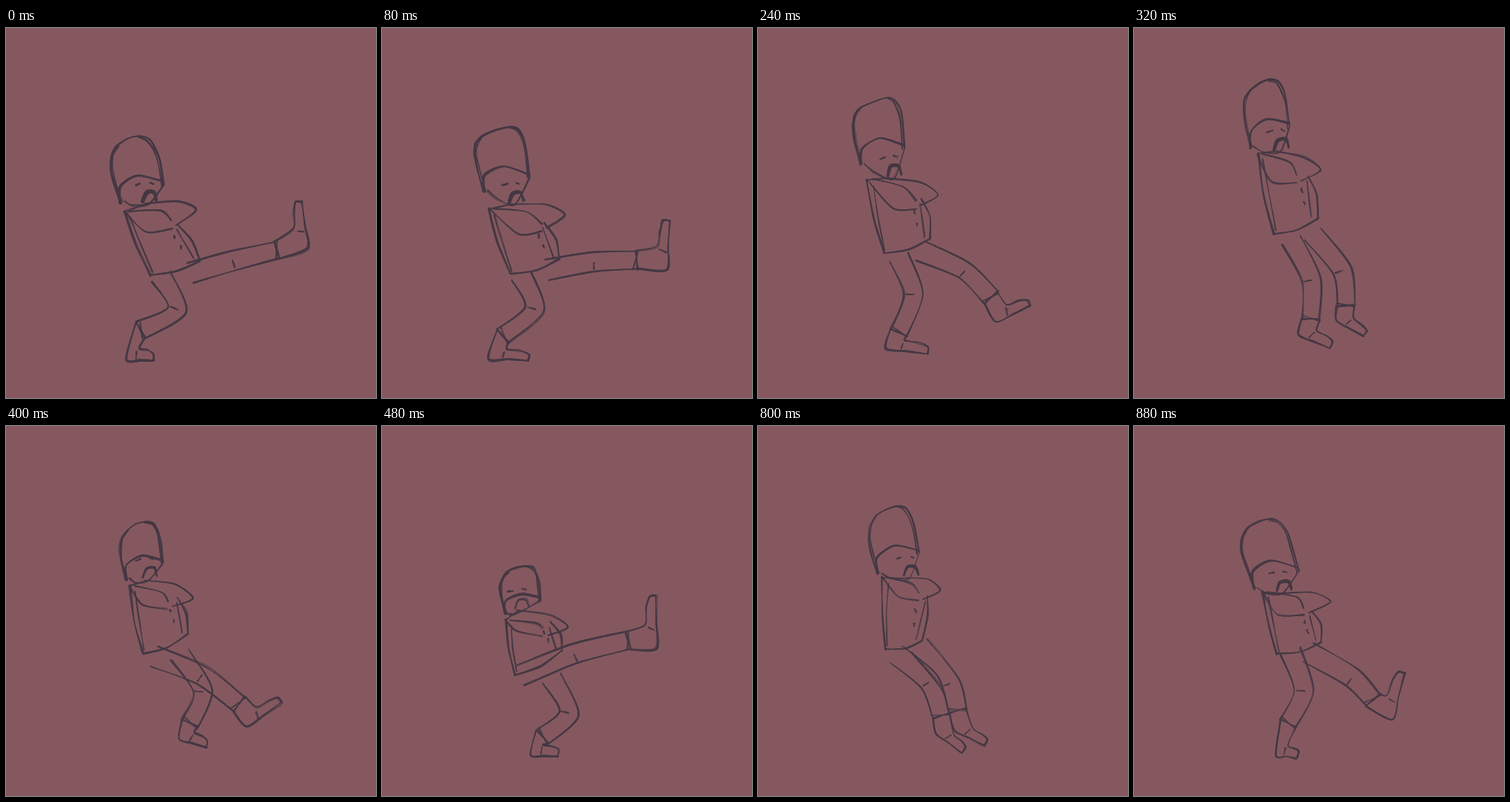
An HTML page with a canvas that plays this animation: 500x500 px, repeating every 0.96 s.

```html
<!DOCTYPE html>
<html lang="en">
<head>
<meta charset="utf-8">
<title>Kick dance sketch</title>
<style>
  html, body { margin: 0; height: 100%; overflow: hidden; background: #85585f; }
  canvas { display: block; width: 100vmin; height: 100vmin; }
</style>
</head>
<body>
<canvas id="stage" width="500" height="500"></canvas>
<script>
const ctx = document.getElementById('stage').getContext('2d');
const STEP = 80;
const LEGS = ['near', 'far'];

// head: brim left, brim right, hat top, mouth
// body: shoulder, back hip, chest, front hip, forearm bend, far elbow
// legs: hip, knee, ankle, heel, toe
// style: line weight, hat roundness, moustache width
function pose(head, body, near, far, style) {
  const points = n => n.filter((_, i) => i % 2 === 0).map((x, i) => [x, n[2 * i + 1]]);
  return { head: points(head), body: points(body), near: points(near), far: points(far), style };
}

const leanBack = pose(
  [155, 236, 213, 212, 165, 150, 196, 226],
  [160, 248, 196, 334, 232, 266, 262, 314, 190, 276, 258, 246],
  [209, 336, 232, 380, 182, 408, 162, 448, 200, 449],
  [249, 331, 306, 314, 366, 300, 408, 298, 400, 234], [1.2, .8, 4.2]);

const upright = pose(
  [120, 207, 186, 192, 143, 124, 170, 227],
  [128, 240, 151, 330, 206, 262, 218, 312, 180, 280, 236, 258],
  [168, 334, 182, 379, 146, 424, 125, 447, 196, 447],
  [197, 324, 265, 320, 320, 328, 354, 355, 372, 291], [1.05, .5, 4]);

const highHop = pose(
  [158, 162, 210, 134, 170, 74, 201, 155],
  [167, 170, 189, 278, 236, 200, 248, 258, 187, 207, 252, 192],
  [213, 286, 240, 340, 239, 393, 222, 415, 264, 432],
  [242, 278, 281, 328, 286, 375, 273, 395, 310, 417], [1, .8, 4.2]);

const crouch = pose(
  [166, 254, 214, 236, 182, 191, 191, 238],
  [167, 262, 180, 336, 228, 265, 244, 304, 182, 276, 252, 272],
  [187, 337, 260, 308, 333, 290, 370, 300, 371, 230],
  [229, 341, 252, 388, 217, 420, 200, 444, 238, 447], [1.1, .8, 1.5]);

const lowKick = pose(
  [165, 252, 214, 236, 178, 183, 192, 241],
  [167, 256, 172, 345, 228, 262, 238, 306, 180, 284, 243, 276],
  [184, 348, 250, 322, 322, 315, 356, 338, 367, 280],
  [202, 352, 232, 386, 200, 417, 182, 442, 232, 446], [.85, .8, 1.5]);

const hop = pose(
  [162, 200, 217, 172, 172, 112, 208, 194],
  [168, 204, 172, 302, 228, 230, 222, 290, 190, 230, 246, 222],
  [186, 308, 232, 346, 247, 391, 240, 415, 275, 442],
  [218, 296, 260, 348, 270, 385, 266, 412, 305, 432], [.9, .8, 4]);

const swingUp = pose(
  [162, 220, 222, 196, 168, 129, 204, 214],
  [173, 224, 194, 308, 240, 250, 254, 292, 194, 254, 265, 238],
  [211, 304, 230, 358, 208, 402, 192, 444, 220, 449],
  [236, 306, 294, 340, 323, 370, 348, 396, 366, 334], [.95, .8, 4.2]);

const mix = (a, b, t = .5) => a.map((v, i) => v + (b[i] - v) * t);
const move = ([x, y], dx, dy) => [x + dx, y + dy];
const along = (p, v, k) => move(p, v[0] * k, v[1] * k);
const diff = (a, b) => [b[0] - a[0], b[1] - a[1]];
const unit = v => v.map(c => c / (Math.hypot(...v) || 1));

// Legs swing about the hip so that they keep their length halfway.
function swing(p, q, hipA, hipB) {
  const a = diff(hipA, p), b = diff(hipB, q);
  const from = Math.atan2(a[1], a[0]), turn = Math.atan2(b[1], b[0]) - from;
  const angle = from + Math.atan2(Math.sin(turn), Math.cos(turn)) / 2;
  return along(mix(hipA, hipB), [Math.cos(angle), Math.sin(angle)], (Math.hypot(...a) + Math.hypot(...b)) / 2);
}

function between(a, b) {
  const half = { style: mix(a.style, b.style) };
  for (const g of ['head', 'body']) half[g] = a[g].map((p, i) => mix(p, b[g][i]));
  for (const g of LEGS) half[g] = a[g].map((p, i) => swing(p, b[g][i], a[g][0], b[g][0]));
  return half;
}

const cycle = [
  leanBack, between(leanBack, upright), upright, between(upright, highHop),
  highHop, between(highHop, crouch), crouch, between(crouch, lowKick),
  lowKick, between(lowKick, hop), hop, swingUp
];

function hatStrokes([left, right, top, mouth], [, round, moustache]) {
  const base = mix(left, right), side = diff(base, right), up = diff(base, top);
  const dome = Array.from({ length: 11 }, (_, i) => {
    const a = Math.PI * (1 - i / 10), s = Math.sin(a), c = Math.cos(a);
    const x = Math.sign(c) * Math.abs(c) ** round * (1 + .4 * s);
    return along(along(base, side, x), up, Math.abs(s) ** round);
  });
  const at = (dx, dy) => move(mouth, dx, dy);
  return [
    [2.1, dome],
    [1.6, dome.slice(6).map(p => along(p, side, -.09))],
    [1.5, dome.slice(0, 5).map(p => along(p, side, .07))],
    [2.7, [left, along(mix(left, right, .08), up, .28), along(base, up, .33), along(right, up, .06)]],
    [1.6, [mix(left, right, .08), move(mix(left, mouth, .4), 0, 8), at(-3, 12), right]],
    [moustache, [at(-11, 9), at(-6, -3), at(4, -4), at(8, 7)]],
    [1.9, [at(-21, -14), at(-14, -16)]],
    [1.5, [at(-2, -18), at(3, -16)]]
  ];
}

function bodyStrokes([shoulder, back, chest, waist, bend, elbow], mouth) {
  const chin = move(mouth, -8, 12), rest = mix(bend, elbow);
  const button = t => move(mix(chest, waist, t), -14, 0);
  return [
    [2.4, [shoulder, move(mix(shoulder, back), -2, 3), back]],
    [1.5, [move(shoulder, 8, 8), move(mix(shoulder, back), 4, 0), move(back, 2, -4)]],
    [2.1, [chest, move(mix(chest, waist), 5, -3), waist]],
    [1.4, [move(chest, -2, 6), move(waist, -8, -2)]],
    [2.2, [back, move(mix(back, waist), 2, 5), waist]],
    [1.8, [shoulder, bend, move(rest, 0, 10)]],
    [1.8, [move(shoulder, 6, 0), mix(shoulder, elbow, .5), rest]],
    [1.9, [chin, move(mix(chin, elbow, .6), 2, -8), elbow, move(mix(elbow, bend, .4), 0, 8)]],
    [1.4, [shoulder, chin]],
    [1.7, [button(.3), move(button(.3), 1, 4)]],
    [1.7, [button(.6), move(button(.6), 1, 4)]]
  ];
}

function legStrokes([hip, knee, ankle, heel, toe]) {
  const thigh = unit(diff(hip, knee)), shin = unit(diff(knee, ankle));
  const dirs = [thigh, unit(mix(thigh, shin)), shin];
  const edge = side => [hip, knee, ankle].map((p, i) => along(p, [-dirs[i][1], dirs[i][0]], side * (14 - i)));
  const a = edge(1), b = edge(-1);
  const gap = p => Math.hypot(...diff(p, toe));
  const [front, rear] = gap(a[2]) < gap(b[2]) ? [a[2], b[2]] : [b[2], a[2]];
  const sole = unit(diff(heel, toe));
  let up = [sole[1], -sole[0]];
  const rise = diff(heel, ankle);
  if (up[0] * rise[0] + up[1] * rise[1] < 0) up = up.map(c => -c);
  const upper = (t, h) => along(mix(heel, toe, t), up, h);
  return [
    [2.1, a], [2.1, b],
    [2.2, [a[2], b[2]]],
    [1.4, [along(a[2], shin, -5), along(b[2], shin, 3)]],
    [1.5, [mix(a[1], b[1], .1), mix(a[1], b[1], .5)]],
    [2.3, [rear, heel, mix(heel, toe), toe]],
    [1.9, [toe, upper(1, 9), upper(.78, 13), upper(.45, 15), front]],
    [1.4, [upper(.35, 2), upper(.4, 11)]]
  ];
}

function random(seed) {
  return () => (seed = seed * 16807 % 2147483647) / 2147483647;
}

function smooth(points) {
  const out = [points[0]];
  const at = i => points[Math.max(0, Math.min(points.length - 1, i))];
  for (let i = 0; i < points.length - 1; i++) {
    for (let k = 1; k <= 10; k++) {
      const t = k / 10, t2 = t * t, t3 = t2 * t;
      out.push([0, 1].map(c => {
        const p = at(i)[c], q = at(i + 1)[c];
        const m = .4 * (q - at(i - 1)[c]), n = .4 * (at(i + 2)[c] - p);
        return (2 * t3 - 3 * t2 + 1) * p + (t3 - 2 * t2 + t) * m + (3 * t2 - 2 * t3) * q + (t3 - t2) * n;
      }));
    }
  }
  return out;
}

// A pencil line whose pressure rises and falls along its length.
function pencil(points, width, rand) {
  const path = smooth(points.map(p => move(p, rand() * 2.4 - 1.2, rand() * 2.4 - 1.2)));
  const phase = rand() * Math.PI;
  for (let i = 1; i < path.length; i++) {
    ctx.lineWidth = width * (.5 + .65 * Math.abs(Math.sin(phase + Math.PI * i / path.length)));
    ctx.beginPath();
    ctx.moveTo(...path[i - 1]);
    ctx.lineTo(...path[i]);
    ctx.stroke();
  }
}

function draw(index) {
  const { head, body, near, far, style } = cycle[index];
  const rand = random(index * 977 + 31);
  const strokes = [
    ...hatStrokes(head, style), ...bodyStrokes(body, head[3]),
    ...legStrokes(near), ...legStrokes(far)
  ];
  ctx.fillStyle = '#85585f';
  ctx.fillRect(0, 0, 500, 500);
  ctx.lineCap = 'round';
  for (const [color, scale] of [['#59434e', .7], ['#443843', 1]]) {
    ctx.strokeStyle = color;
    for (const [width, points] of strokes) pencil(points, width * style[0] * scale, rand);
  }
}

const start = performance.now();
let shown = -1;
function tick() {
  const index = Math.floor((performance.now() - start) / STEP) % cycle.length;
  if (index !== shown) draw(shown = index);
  requestAnimationFrame(tick);
}
tick();
</script>
</body>
</html>
```
